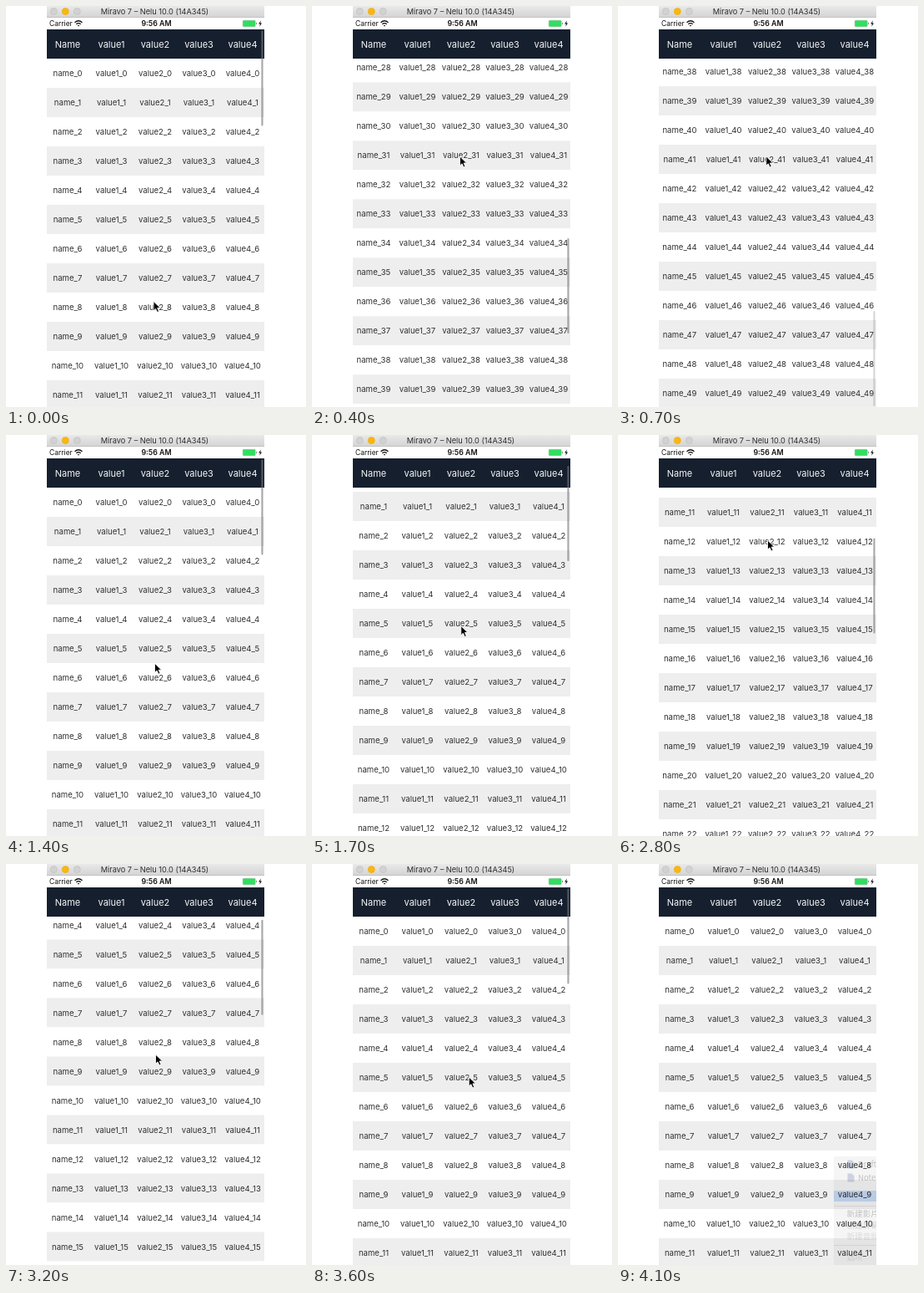
These frames come from a looping animation (360x480 px, 4.2 s). An HTML page:

```html
<!DOCTYPE html>
<html lang="en">
<head>
<meta charset="utf-8">
<title>Scrolling table</title>
<style>
html, body { margin: 0; width: 360px; height: 480px; overflow: hidden; background: #fff; }
svg { display: block; }
text { font-family: Inter, "Open Sans", sans-serif; }
.mid { text-anchor: middle; }
.cell { font-size: 9.6px; fill: #303030; }
.head { font-size: 11px; fill: #f4f6f8; }
.menu { mix-blend-mode: multiply; }
.menu text { font: 9.6px "Noto Sans CJK SC", "Noto Sans CJK", sans-serif; fill: #c2c2c2; }
</style>
</head>
<body>
<svg width="360" height="480" viewBox="0 0 360 480">
  <defs>
    <linearGradient id="chrome" x2="0" y2="1">
      <stop stop-color="#e9e9e9"/><stop offset="1" stop-color="#d3d3d3"/>
    </linearGradient>
    <clipPath id="screen"><rect x="49" width="261" height="480"/></clipPath>
  </defs>

  <g clip-path="url(#screen)">
    <g id="rows"></g>
    <g id="menu" class="menu">
      <rect x="259" y="350" width="70" height="134" rx="3" fill="#f5f5f5"/>
      <rect x="259" y="391" width="70" height="13" fill="#c6daf5"/>
      <path d="M275.5 354.5h5l3 3v7h-8zM275.5 370.5h5l3 3v7h-8z" fill="#cdd2e2"/>
      <path d="M259 409.5h51M259 456.5h51" stroke="#e2e2e2"/>
      <text x="288" y="363">Draft</text>
      <text x="288" y="379">Notes</text>
      <text x="274.5" y="422">新建影片录制</text>
      <text x="274.5" y="436" opacity=".7">新建屏幕录制</text>
      <text x="274.5" y="449" opacity=".5">新建音频录制</text>
      <text x="274.5" y="474" opacity=".5">选项</text>
    </g>
  </g>

  <rect x="49" width="261" height="14" fill="url(#chrome)"/>
  <rect x="49" y="13.3" width="261" height=".7" fill="#bcbcbc"/>
  <g stroke-width=".6" fill="#d2d2d2" stroke="#bdbdbd">
    <circle cx="57.3" cy="6.5" r="4"/>
    <circle cx="71.3" cy="6.5" r="4" fill="#fdb60d" stroke="#e8a80c"/>
    <circle cx="85.3" cy="6.5" r="4"/>
  </g>
  <text class="mid" x="178.5" y="10" font-size="9.2" fill="#2c2c2c">Miravo 7 – Nelu 10.0 (14A345)</text>

  <rect x="49" y="14" width="261" height="14" fill="#fff"/>
  <text x="52" y="24.4" font-size="8.5" fill="#111">Carrier</text>
  <g fill="none" stroke="#111" stroke-width="1.3">
    <path d="M82.5 19.8Q87 15.8 91.5 19.8M84.3 21.8Q87 19.6 89.7 21.8"/>
    <path d="M85.6 23 L87 24.6 L88.4 23Z" fill="#111" stroke="none"/>
  </g>
  <text class="mid" x="180.5" y="24.4" font-size="8.8" font-weight="600" fill="#111">9:56 AM</text>
  <rect x="284.2" y="17.3" width="15" height="7.4" rx="1.2" fill="#2fdf5f" stroke="#8fae98" stroke-width=".5"/>
  <path d="M300.2 19.6v2.8q1-.4 1-1.4t-1-1.4z" fill="#777"/>
  <path d="M305.8 17.3L303.2 21.5H305L304.2 24.7L307 20.4H305.2Z" fill="#111"/>

  <rect x="49" y="28" width="261" height="35" fill="#151f2e"/>
  <g id="head"></g>
  <rect id="bar" x="306.4" width="2.1" height="114" rx="1" fill="#77777b"/>

  <g clip-path="url(#screen)">
    <path id="cursor" d="M0 0V11.2L2.6 8.8L4.5 13L6.5 12.1L4.7 8H8.2Z"
      fill="#000" stroke="#fff" stroke-width=".9" stroke-linejoin="round"/>
  </g>
</svg>
<script>
const LOOP = 4200, TICK = 100, ROW = 35, COUNT = 50, MAX = 1332;
const $ = id => document.getElementById(id);
const clamp = v => Math.min(1, Math.max(0, v));

function set(el, attrs) {
  for (const k in attrs) el.setAttribute(k, attrs[k]);
}

function add(parent, tag, attrs, text = '') {
  const el = document.createElementNS('http://www.w3.org/2000/svg', tag);
  set(el, attrs);
  el.textContent = text;
  parent.append(el);
}

const names = ['name', 'value1', 'value2', 'value3', 'value4'];

function addCells(parent, style, y, label) {
  names.forEach((n, i) =>
    add(parent, 'text', { class: `mid ${style}`, x: 74 + 52.5 * i, y }, label(n)));
}

addCells($('head'), 'head', 49.5, n => n.replace('name', 'Name'));
for (let r = 0; r < COUNT; r++) {
  const y = 63 + r * ROW;
  add($('rows'), 'rect', { x: 49, y, width: 261, height: ROW, fill: r % 2 ? '#eee' : '#fff' });
  addCells($('rows'), 'cell', y + 21, n => `${n}_${r}`);
}

// Smooth curve through [time, value] keys that never overshoots them
function curve(keys) {
  const slope = i => keys[i] && keys[i + 1]
    ? (keys[i + 1][1] - keys[i][1]) / (keys[i + 1][0] - keys[i][0]) : 0;
  const tangent = i => {
    const a = slope(i - 1), b = slope(i);
    return a * b > 0 ? 2 * a * b / (a + b) : 0;
  };
  return t => {
    const i = keys.findLastIndex(k => k[0] <= t);
    if (i === keys.length - 1) return keys[i][1];
    const [t0, a] = keys[i], [t1, b] = keys[i + 1];
    const d = t1 - t0, u = (t - t0) / d, v = 1 - u;
    return a * v * v * (1 + 2 * u) + b * u * u * (1 + 2 * v)
      + d * u * v * (tangent(i) * v - tangent(i + 1) * u);
  };
}

// Flick to the end, flick back, drag down in two pulls, flick home
const scrollAt = curve([[0, 0], [600, MAX], [750, MAX], [1400, 0], [1500, 0],
  [1700, 30], [2400, 274.5], [2800, 373], [3200, 147.5], [3600, 0]]);
const pointerY = curve([[0, 353.5], [300, 180], [700, 180], [1200, 285], [1700, 228.5],
  [2000, 127], [2800, 126], [3200, 228], [3500, 228], [3900, 400]]);
const pointerX = t => 177 + 2.5 * clamp(t / 2400) + 140 * clamp((t - 3500) / 400) ** 2;

function draw(t) {
  const s = scrollAt(t);
  set($('rows'), { transform: `translate(0 ${-s})` });
  set($('bar'), {
    y: 29.5 + s / MAX * 335.5,
    opacity: (s === MAX ? 0.3 : 0.65) * clamp((3900 - t) / 200)
  });
  set($('cursor'), { transform: `translate(${pointerX(t)} ${pointerY(t)})` });
  set($('menu'), { opacity: t < LOOP - TICK ? 0 : 1 });
}

const start = performance.now();
function frame() {
  const t = (performance.now() - start) % LOOP;
  draw(Math.floor(t / TICK) * TICK);
  requestAnimationFrame(frame);
}
frame();
</script>
</body>
</html>
```
